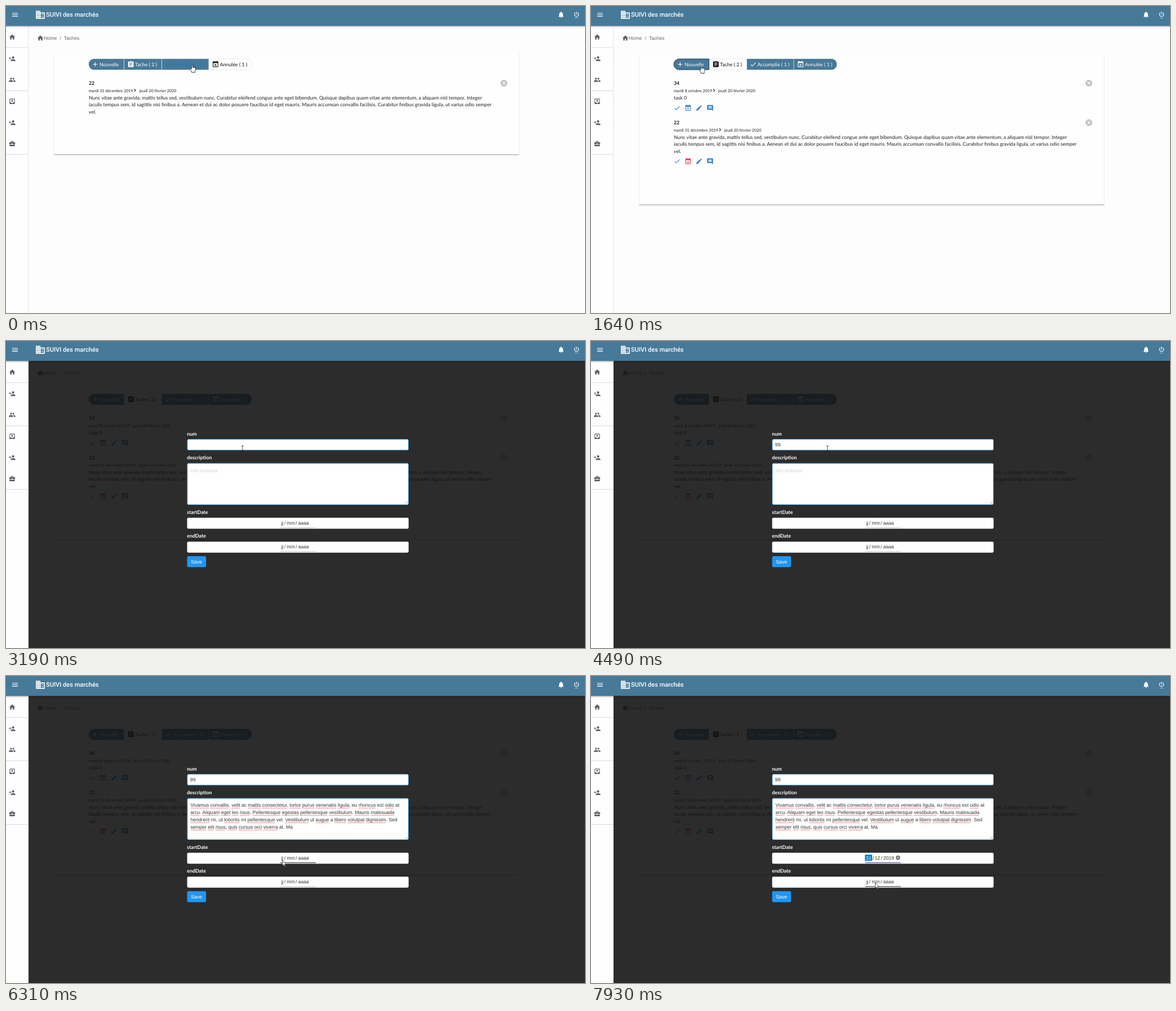
These frames come from a looping animation (1028 px wide and 545 px high, 8 s). An HTML page:

```html
<!DOCTYPE html>
<html lang="fr">
<head>
<meta charset="utf-8">
<title>Taches</title>
<style>
html,body{margin:0;width:100%;height:100%;overflow:hidden;background:#fdfdfd}
svg{display:block;width:1028px;height:545px;text-rendering:geometricPrecision}
text{font:8.72px Lato,sans-serif;fill:#1f1f1f;white-space:pre}
.bold{font-weight:700}
.date{font-size:7.15px}
.btn text{font-size:8.8px}
.arial,.arial text{font-family:"Liberation Sans",Arial,sans-serif;font-size:8.6px;fill:#333}
.label{font-size:8.85px;font-weight:700;fill:#fff}
.title{font:500 11.05px Roboto,sans-serif;fill:#fff}
.cal text{font:6.1px "Noto Sans",sans-serif;text-anchor:middle}
.side{fill:#5f5f5f}
.blue{fill:#2c78c4}
.red{fill:#ee2a50}
.field{fill:#fff;stroke:#56aee6}
.field.focus{stroke:#3d9fe0}
</style>
</head>
<body>
<script>
const icons = {
  menu: 'M3 18h18v-2H3zm0-5h18v-2H3zM3 6v2h18V6z',
  home: 'M10 20v-6h4v6h5v-8h3L12 3 2 12h3v8z',
  addUser: 'M15 12a4 4 0 1 0 0-8 4 4 0 0 0 0 8zM6 10V7H4v3H1v2h3v3h2v-3h3v-2zm9 4c-2.67 0-8 1.34-8 4v2h16v-2c0-2.66-5.33-4-8-4z',
  group: 'M16 11a3 3 0 1 0 0-6 3 3 0 0 0 0 6zm-8 0a3 3 0 1 0 0-6 3 3 0 0 0 0 6zm0 2c-2.33 0-7 1.17-7 3.5V19h14v-2.5C15 14.17 10.33 13 8 13zm8 0l-1 .05c1.16.84 2 1.97 2 3.45V19h6v-2.5c0-2.33-4.67-3.5-7-3.5z',
  inbox: 'M19 3H5a2 2 0 0 0-2 2v14a2 2 0 0 0 2 2h14a2 2 0 0 0 2-2V5a2 2 0 0 0-2-2zm0 12h-4a3 3 0 0 1-6 0H5V5h14zm-3-5h-2V7h-4v3H8l4 4z',
  bag: 'M10 16v-1H3v4a2 2 0 0 0 2 2h14a2 2 0 0 0 2-2v-4h-7v1zM20 7h-4V5l-2-2h-4L8 5v2H4a2 2 0 0 0-2 2v3a2 2 0 0 0 2 2h6v-2h4v2h6a2 2 0 0 0 2-2V9a2 2 0 0 0-2-2zm-6 0h-4V5h4z',
  building: 'M12 7V3H2v18h20V7zM6 19H4v-2h2zm0-4H4v-2h2zm0-4H4V9h2zm0-4H4V5h2zm4 12H8v-2h2zm0-4H8v-2h2zm0-4H8V9h2zm0-4H8V5h2zm10 12h-8v-2h2v-2h-2v-2h2v-2h-2V9h8zm-2-8h-2v2h2zm0 4h-2v2h2z',
  bell: 'M12 22a2 2 0 0 0 2-2h-4a2 2 0 0 0 2 2zm6-6v-5c0-3.07-1.64-5.64-4.5-6.32V4a1.5 1.5 0 0 0-3 0v.68C7.63 5.36 6 7.92 6 11v5l-2 2v1h16v-1z',
  power: 'M7 24h2v-2H7zm4 0h2v-2h-2zm2-22h-2v10h2zm3.56 2.44l-1.45 1.45A6 6 0 1 1 8.88 5.88L7.44 4.44a8 8 0 1 0 9.12 0zM15 24h2v-2h-2z',
  plus: 'M19 13h-6v6h-2v-6H5v-2h6V5h2v6h6z',
  clip: 'M19 3h-4.2a3 3 0 0 0-5.6 0H5a2 2 0 0 0-2 2v14a2 2 0 0 0 2 2h14a2 2 0 0 0 2-2V5a2 2 0 0 0-2-2zm-7 0a1 1 0 0 1 0 2 1 1 0 0 1 0-2zm2 14H7v-2h7zm3-4H7v-2h10zm0-4H7V7h10z',
  check: 'M9 16.2L4.8 12l-1.4 1.4L9 19 21 7l-1.4-1.4z',
  busy: 'M9.3 17l2.45-2.45L14.2 17l1.05-1.06-2.44-2.44 2.44-2.44L14.2 10l-2.45 2.44L9.3 10l-1.05 1.06 2.44 2.44-2.44 2.44zM19 3h-1V1h-2v2H8V1H6v2H5a2 2 0 0 0-2 2v14a2 2 0 0 0 2 2h14a2 2 0 0 0 2-2V5a2 2 0 0 0-2-2zm0 16H5V8h14z',
  edit: 'M3 17.25V21h3.75L17.8 9.94l-3.75-3.75zM20.7 7.04a1 1 0 0 0 0-1.41l-2.33-2.34a1 1 0 0 0-1.41 0l-1.83 1.83 3.75 3.75z',
  note: 'M22 4a2 2 0 0 0-2-2H4a2 2 0 0 0-2 2v12a2 2 0 0 0 2 2h14l4 4zM18 14H6v-2h12zm0-3H6V9h12zm0-3H6V6h12z',
  cancel: 'M12 2a10 10 0 1 0 0 20 10 10 0 0 0 0-20zm5 13.6L15.6 17 12 13.4 8.4 17 7 15.6l3.6-3.6L7 8.4 8.4 7l3.6 3.6L15.6 7 17 8.4 13.4 12z',
  next: 'M10 6L8.6 7.4l4.6 4.6-4.6 4.6L10 18l6-6z'
};
const icon = (name, cx, cy, size, attr = '') =>
  `<path d="${icons[name]}" ${attr} transform="translate(${cx - size / 2} ${cy - size / 2}) scale(${size / 24})"/>`;
const text = (x, y, s, attr = '') => `<text x="${x}" y="${y}" ${attr}>${s}</text>`;
const rect = (x, y, w, h, attr = '') => `<rect x="${x}" y="${y}" width="${w}" height="${h}" ${attr}/>`;

const lorem = [
  'Nunc vitae ante gravida, mattis tellus sed, vestibulum nunc. Curabitur eleifend congue ante eget bibendum. Quisque dapibus quam vitae ante elementum, a aliquam nisl tempor. Integer',
  'iaculis tempus sem, id sagittis nisi finibus a. Aenean et dui ac dolor posuere faucibus id eget mauris. Mauris accumsan convallis facilisis. Curabitur finibus gravida ligula, ut varius odio semper',
  'vel.'
];
const item = (y, num, from, arrowX, lines) =>
  text(147, y + 3.3, num, 'class="bold"') + icon('cancel', 884, y, 14.4, 'fill="#c2c2c2"') +
  text(147, y + 15.7, from, 'class="date"') + icon('next', arrowX, y + 12.7, 11.5) +
  text(arrowX + 7.5, y + 15.7, 'jeudi 20 février 2020', 'class="date"') +
  lines.map((s, i) => text(147, y + 28.6 + i * 12.5, s)).join('');
const item34 = y => item(y, '34', 'mardi 8 octobre 2019', 218.3, ['task 0']);
const item22 = y => item(y, '22', 'mardi 31 décembre 2019', 229, lorem);
const actions = (y, late) => ['check', 'busy', 'edit', 'note'].map((n, i) =>
  icon(n, 152.9 + i * 19.5, y, 12.6, `class="${late && i == 1 ? 'red' : 'blue'}"`)).join('');

const edges = [147, 209.5, 276.5, 360, 436.5];
const tabs = [['plus', 158.3, 166, 'Nouvelle'], ['clip', 221.7, 229, 'Tache ( 2 )'],
  ['check', 288, 295.5, 'Accomplie ( 1 )'], ['busy', 372, 379.7, 'Annulée ( 1 )']];
const tab = ([name, cx, tx, label], i) => `<g class="btn" id="tab${i}">` +
  rect(edges[i], 93.7, edges[i + 1] - edges[i], 19.6, 'clip-path="url(#pill)"') +
  `<g>${icon(name, cx, 103.5, 13.2)}${text(tx, 107, label, 'style="fill:inherit"')}</g></g>`;

const dateField = (id, y) => rect(321.6, y, 393.2, 19.5, 'rx="2.4" fill="#fff"') +
  `<g id="${id}Empty">` + [[488.7, 'jj'], [494, '/'], [498.6, 'mm'], [514.3, '/'], [518.7, 'aaaa']]
    .map(([x, s], i) => text(x, y + 12, s, `class="arial" id="${id}${i}"`)).join('') + '</g>' +
  rect(487, y + 17.1, 63, 1, `id="${id}Line"`);

const dayX = c => 504.7 + c * 18.6, dayY = r => 382.5 + r * 14.1;
const cell = (c, r, attr) => rect(dayX(c) - 8, dayY(r) - 6.5, 16, 13, 'rx="1" ' + attr);
const days = () => {
  let s = '';
  for (let i = 0; i < 42; i++) {
    const c = i % 7, r = i / 7 | 0, out = i < 2 || i > 32;
    const d = i < 2 ? 30 + i : i < 33 ? i - 1 : i - 32;
    s += text(dayX(c), dayY(r) + 2.3, d,
      `style="fill:${c > 4 ? '#e01818' : '#111'};opacity:${out ? .5 : 1};font-weight:${i == 15 ? 700 : 400}"`);
  }
  return s;
};
const calendar = `<g id="cal" class="cal">
  <path d="M489.5 337.5h4l5-5.5 5 5.5h127.5v128h-141.5z" fill="#fff" stroke="#c4c4c4" stroke-width=".8"/>
  ${rect(529.3, 344.5, 62, 12, 'rx="1.5" fill="#fbfbfb" stroke="#888" stroke-width=".8"')}
  ${text(556, 353.3, 'janvier 2020', 'style="font-size:7px"')}
  <path d="M505 347.5l-3 3 3 3M615.5 347.5l3 3-3 3M581 349.3l2.5 2.5 2.5-2.5" fill="none" stroke="#555"/>
  ${['lun.', 'mar.', 'mer.', 'jeu.', 'ven.', 'sam.', 'dim.'].map((d, i) =>
    text(dayX(i), 370.7, d, `style="fill:${i > 4 ? '#ea6a6a' : '#777'}"`)).join('')}
  ${cell(1, 2, 'fill="#8c8c8c"')}
  ${cell(0, 0, 'id="hot" fill="#ececec" stroke="#aaa" stroke-width=".8"')}
  ${days()}</g>`;

const note = [
  'Vivamus convallis, velit ac mattis consectetur, tortor purus venenatis ligula, eu rhoncus est odio at',
  'arcu. Aliquam eget leo risus. Pellentesque egestas pellentesque vestibulum. Mauris malesuada',
  'hendrerit mi, ut lobortis mi pellentesque vel. Vestibulum ut augue a libero volutpat dignissim. Sed',
  'semper elit risus, quis cursus orci viverra at. Ma'
];

document.body.innerHTML = `<svg id="stage" viewBox="0 0 1028 545">
<clipPath id="pill">${rect(147, 93.7, 289.5, 19.6, 'rx="9.8"')}</clipPath>
${rect(0, 0, 1028, 545, 'fill="#fdfdfd"')}
${icon('home', 61, 57, 12.5, 'class="side"')}
${text(67, 60, 'Home', 'class="arial" style="font-size:8.8px;fill:#666"')}
${text(95.5, 60, '/', 'class="arial" style="fill:#777"')}
${text(103, 60, 'Taches', 'class="arial" style="fill:#666"')}
<path id="sides" fill="#fefefe" stroke="#e9e9e9" stroke-width=".8"/>
<path id="foot" stroke="#b9b9b9" stroke-width="1.3"/>
${tabs.map(tab).join('')}
<path d="M209.5 94v19M276.5 94v19M360 94v19" stroke="#dfe7ec" stroke-width=".8"/>
${rect(147, 93.7, 289.5, 19.6, 'rx="9.8" fill="none" stroke="#000" stroke-opacity=".1" stroke-width=".8"')}
<g id="press" fill="none" stroke="#1d4258"><path d="M209.5 94v19H156.5a9.5 9.5 0 0 1 0-19z"/><path d="M209.5 94h67v19h-67z"/></g>
<g id="list3">${item22(137)}</g>
<g id="list2">${item34(137)}</g>
<g id="list1">${item34(137)}${actions(181, false)}${item22(207)}${actions(275.7, true)}</g>
${rect(40, 35, 988, 510, 'id="shade" fill="rgba(17,17,17,.885)"')}
<g id="modal">
  ${[['num', 167.5], ['description', 209.7], ['startDate', 306.6], ['endDate', 349]].map(([s, y]) => text(321.3, y, s, 'class="label"')).join('')}
  ${rect(322, 174.5, 392.4, 19.2, 'id="num" class="field" rx="2.2"')}
  ${rect(322, 217.2, 392.4, 73.3, 'id="area" class="field" rx="2.2"')}
  <path d="M708.5 289l4.5-4.5M711 289l2-2" stroke="#888" stroke-width=".7"/>
  ${text(326.8, 187.2, '', 'id="digits" class="arial" style="font-size:8.75px"')}
  ${text(327.4, 232.5, 'Info textarea', 'id="hint" class="arial" style="fill:#d2d2d2"')}
  <g id="note" class="arial">${note.map((s, i) => text(327.5, 232.4 + i * 12.95, s)).join('')}</g>
  <path id="waves" fill="none" stroke="#f23c3c" stroke-width=".7"/>
  ${rect(326, 179, .9, 10, 'id="caret" fill="#111"')}
  ${dateField('start', 313.8)}
  ${rect(487, 317.2, 7, 10.8, 'id="mark" fill="#0a78d6"')}
  <text id="markText" class="arial" y="325.8" style="fill:#fff"></text>
  <g id="picked">${[[499.9, '/'], [503.8, '12'], [514.9, '/'], [519, '2019']].map(([x, s]) => text(x, 325.8, s, 'class="arial"')).join('')}
  ${icon('cancel', 545, 322.4, 9, 'fill="#666"')}</g>
  ${dateField('end', 356.2)}
  ${rect(321.6, 382, 33.7, 19.4, 'rx="2.4" fill="#2196f0"')}
  ${text(328.2, 394.8, 'Save', 'class="arial" style="font-size:8.75px;fill:#fff"')}
  ${calendar}
</g>
${rect(0, 35, 40, 510, 'fill="#fefefe"')}
<path id="sideEdge" d="M39.7 36V545" stroke="#dcdcdc" stroke-width=".8"/>
<path d="M0 73.8H40M0 150.5H40M0 263.5H40" stroke="#dadada"/>
<path id="ticks" d="M39.5 94v2M39.5 131v2M39.5 170v2M39.5 207v2" stroke="#ccc" stroke-width=".8"/>
${['home', 'addUser', 'group', 'inbox', 'addUser', 'bag'].map((n, i) =>
  icon(n, 11, [55.3, 93.5, 131, 169.3, 207, 244.3][i], 12.6, 'class="side"')).join('')}
<g style="filter:drop-shadow(0 1px 1.5px rgba(0,0,0,.35))">${rect(-5, -5, 1038, 40.4, 'fill="#477999"')}</g>
<g fill="#fff">${icon('menu', 16, 15.5, 13.5)}${icon('building', 61, 15.5, 19)}${icon('bell', 985.5, 15.3, 13.5)}${icon('power', 1013, 15.5, 13)}</g>
${text(71, 19.3, 'SUIVI des marchés', 'class="title"')}
<g id="pointer">
  <path id="arrow" d="M0 0V9.6L2.2 7.6 3.7 11 5.2 10.4 3.7 7H6.8Z" fill="#fff" stroke="#111" stroke-width=".7"/>
  <path id="hand" d="M-1 1v6.5l-1.4-1.2c-1.2-.6-1.8.4-1.2 1.2L-.8 11.8V13.5H5V11.5C6 10 6 8 6 5.5 6 4.4 4.4 4.4 4.4 5.4 4.4 4 2.8 4 2.7 5 2.6 3.8 1 3.8 1 4.8V1C1-.3-1-.3-1 1Z" fill="#fff" stroke="#111" stroke-width=".8"/>
  <path id="beam" d="M-2-4.5H2M0-4.5V4.5M-2 4.5H2" fill="none" stroke="#222" stroke-width=".8"/>
</g></svg>`;

const $ = id => document.getElementById(id);
const show = (id, on) => { $(id).style.display = on ? '' : 'none'; };
const set = (id, attrs) => { for (const k in attrs) $(id).setAttribute(k, attrs[k]); };

// Spelling marks below the longer words
let waves = '';
[...$('note').children].forEach((el, row) => {
  for (const m of note[row].matchAll(/\w{3,}/g)) {
    if (['est', 'vel', 'Sed'].includes(m[0])) continue;
    const a = el.getStartPositionOfChar(m.index).x;
    const b = el.getEndPositionOfChar(m.index + m[0].length - 1).x;
    const y = 235.1 + row * 12.95;
    waves += `M${a} ${y}`;
    for (let x = a + 1.25, up = 1; x < b; x += 1.25, up ^= 1) waves += `L${x} ${y - up * 1.2}`;
  }
});
set('waves', { d: waves });

// Pointer moves: start time, number of 90 ms steps, end point
const STEP = 90;
const moves = [[90, 1, 330.5, 105], [370, 5, 243, 106], [1090, 4, 196, 106], [1820, 1, 195, 106.5],
  [1910, 8, 416.5, 191], [2910, 1, 420, 190.7], [5500, 6, 514, 385], [6040, 3, 503, 350],
  [6310, 1, 491, 327.5], [6490, 5, 527, 401], [6940, 2, 527, 400], [7120, 1, 526.5, 398.5],
  [7300, 3, 524, 384], [7660, 4, 504.7, 367]];
function pointerAt(t) {
  let x = 330.5, y = 104.5;
  for (const [t0, n, tx, ty] of moves) {
    if (t < t0) break;
    const p = Math.min(1, (Math.floor((t - t0) / STEP) + 1) / n);
    const e = p * p * (3 - 2 * p);
    x += (tx - x) * e;
    y += (ty - y) * e;
  }
  return [x, y];
}
const within = (x, y, x0, y0, x1, y1) => x >= x0 && x <= x1 && y >= y0 && y <= y1;
const lineColor = (focus, hover) => focus ? '#32328c' : hover ? '#222' : '#bdbdbd';

// Caret spans: from, to, x, y
const carets = [[2630, 3190, 326, 179], [3560, 3740, 332, 179], [3740, 4020, 336.5, 179],
  [4020, 4490, 327, 224], [4770, 5040, 509, 263]];

function draw(t) {
  const modal = t >= 1820, active = t < 370 ? 3 : t < 1090 ? 2 : 1;
  const [x, y] = pointerAt(t);
  const pressed = t >= 910 && t < 1090 ? 1 : t >= 1640 && !modal ? 0 : -1;
  const over = !modal && within(x, y, 147, 94, 436.5, 113) ? edges.findIndex((e, i) => x >= e && x < edges[i + 1]) : -1;

  tabs.forEach((_, i) => {
    const [bg, label] = $('tab' + i).children;
    bg.setAttribute('fill', i == active ? '#fff' : '#477999');
    label.setAttribute('fill', i == active ? '#111' : i == over && i != pressed ? '#2374bd' : '#fff');
  });
  [...$('press').children].forEach((el, i) => { el.style.display = i == pressed ? '' : 'none'; });
  for (const i of [1, 2, 3]) show('list' + i, i == active);
  const bottom = [0, 353, 239, 264][active];
  set('sides', { d: `M85.3 85V${bottom}H911.2V85` });
  set('foot', { d: `M85.5 ${bottom}H911` });
  show('shade', modal);
  show('modal', modal);
  show('sideEdge', !modal);
  show('ticks', !modal);

  const open = t >= 6400 && t < 7660, picked = t >= 7660;
  $('num').classList.toggle('focus', t >= 2630 && t < 4020);
  $('area').classList.toggle('focus', t >= 4020 && t < 6400);
  $('digits').textContent = t < 3560 ? '' : t < 3740 ? '9' : '99';
  show('hint', t < 4770);
  show('note', t >= 4770);
  show('waves', t >= 4860);
  const caret = carets.find(c => t >= c[0] && t < c[1]);
  show('caret', caret);
  if (caret) set('caret', { x: caret[2], y: caret[3] });

  show('startEmpty', !picked);
  show('start0', !open);
  show('picked', picked);
  show('mark', open || picked);
  set('mark', picked ? { x: 486.4, width: 12.8 } : { x: 487, width: 7 });
  set('markText', { x: picked ? 488 : 488.7 });
  $('markText').textContent = picked ? '31' : open ? 'jj' : '';
  set('startLine', { fill: lineColor(open || picked, within(x, y, 487, 314, 550, 333)) });
  set('endLine', { fill: lineColor(false, !open && within(x, y, 487, 356, 550, 376)) });

  show('cal', open);
  const c = Math.round((x - dayX(0)) / 18.6), r = Math.round((y - dayY(0)) / 14.1);
  show('hot', within(c, r, 0, 0, 6, 5));
  set('hot', { x: dayX(c) - 8, y: dayY(r) - 6.5 });

  const beam = modal && !open && (within(x, y, 321, 174, 715, 194) || within(x, y, 321, 217, 715, 291));
  show('hand', over >= 0);
  show('beam', beam);
  show('arrow', over < 0 && !beam);
  set('pointer', { transform: `translate(${x} ${y})` });
}

let start;
function tick(now) {
  start ??= now;
  draw((now - start) % 8000);
  requestAnimationFrame(tick);
}
draw(0);
requestAnimationFrame(tick);
</script>
</body>
</html>
```
